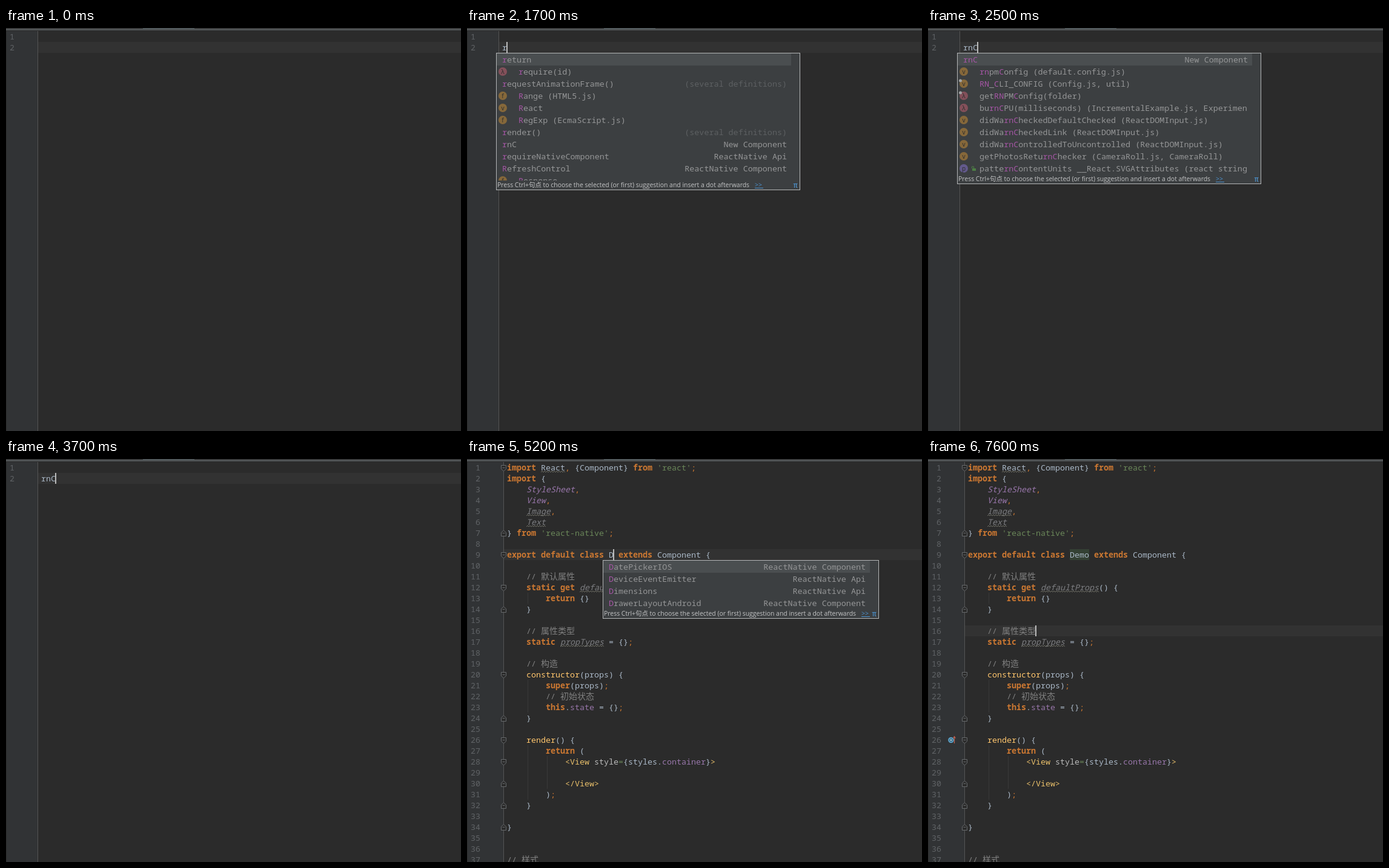
An HTML page for the animation above (8000 ms loop, 751 by 666 pixels).

```html
<!DOCTYPE html>
<html lang="en">
<head>
<meta charset="utf-8">
<title>Live template in an editor</title>
<style>
html, body { margin: 0; width: 100%; height: 100%; overflow: hidden; background: #2b2b2b; }
svg { display: block; }
text { font: 13.333px "Noto Sans Mono", "DejaVu Sans Mono", monospace; white-space: pre; fill: #a9b7c6; }
.num { fill: #606366; text-anchor: end; }
.k { fill: #cc7832; font-weight: 600; }
.o { fill: #cc7832; }
.s { fill: #6a8759; }
.t { fill: #e8bf6a; }
.a { fill: #bababa; }
.c, .z { fill: #808080; }
.z { font: 14px "Noto Sans CJK SC", "Noto Sans CJK JP", sans-serif; }
.y { fill: #ffc66d; }
.p { fill: #9876aa; }
.i { fill: #9876aa; font-style: italic; }
.u { fill: #7c7d80; font-style: italic; }
.item, .hit, .dim { font-size: 13.4px; }
.item { fill: #959697; }
.hit { fill: #a656a6; }
.dim { fill: #5d6062; }
.bold { font-weight: 600; }
.end { text-anchor: end; }
.icon { font: 10px "Noto Sans", sans-serif; fill: #2f2f2f; text-anchor: middle; }
.hint { font: 10.45px "Open Sans", "Noto Sans CJK SC", sans-serif; fill: #c3c4c5; }
.link { fill: #4c93d0; }
</style>
</head>
<body>
<svg id="stage" width="751" height="666" viewBox="0 0 751 666"></svg>
<script>
const LOOP = 8000, CHAR = 8, ITEM_CHAR = 8.04, LINE = 18, ROW = 20;
const stage = document.getElementById('stage');

// ‹x…› marks a token of style x; NAME is filled in while typing.
const code = `‹kimport› ‹wReact›‹o,› {Component} ‹kfrom› ‹s'react'›‹o;›
‹kimport› {
    ‹iStyleSheet›‹o,›
    ‹iView›‹o,›
    ‹uImage›‹o,›
    ‹uText›
} ‹kfrom› ‹s'react-native'›‹o;›

‹kexport› ‹kdefault› ‹kclass› NAME ‹kextends› Component {

    ‹c//› ‹z默认属性›
    ‹kstatic› ‹kget› ‹udefaultProps›() {
        ‹kreturn› {}
    }

    ‹c//› ‹z属性类型›
    ‹kstatic› ‹upropTypes› = {}‹o;›

    ‹c//› ‹z构造›
    ‹yconstructor›(props) {
        ‹ksuper›(props)‹o;›
        ‹c//› ‹z初始状态›
        ‹kthis›.‹pstate› = {}‹o;›
    }

    ‹yrender›() {
        ‹kreturn› (
            ‹t<View› ‹astyle›‹s=›{styles.‹pcontainer›}‹t>›

            ‹t</View>›
        )‹o;›
    }

}


‹c//› ‹z样式›`.split('\n');
const foldStarts = [1, 9, 12, 20, 26, 28], foldEnds = [7, 14, 24, 30, 32, 34];
const guides = [[100, 13, 13], [100, 21, 23], [100, 27, 31], [132, 28, 30]];
const semantic = 'wiupy';

// Items: text with ~matched~ parts, icon letter, right-hand note, badge.
const api = 'ReactNative Api', component = 'ReactNative Component', several = '(several definitions)';
const rnItems = [
  ['retu~rn~'],
  ['_possibleConstructorRetu~rn~(self, call) (table.js, serve', 'λ'],
  ['CanvasPatte~rn~ (HTML5.js)', 'f'],
  ['getInte~rn~alInstanceName()', '', several],
  ['IEExte~rn~al (DHTML.js)', 'f'],
  ['stringInte~rn~er()', '', several],
  ['Worke~rN~avigator (HTML5.js)', 'f'],
  ['~rn~C', '', 'New Component'],
  ['~r~equire~N~ativeComponent', '', api]
];
const rItems = [
  ['~r~eturn'],
  ['~r~equire(id)', 'λ'],
  ['~r~equestAnimationFrame()', '', several],
  ['~R~ange (HTML5.js)', 'f'],
  ['~R~eact', 'v'],
  ['~R~egExp (EcmaScript.js)', 'f'],
  ['~r~ender()', '', several],
  ['~r~nC', '', 'New Component'],
  ['~r~equireNativeComponent', '', api],
  ['~R~efreshControl', '', component],
  ['~R~esponse', 'f']
];
const lists = {
  r: rItems,
  rn: rnItems,
  rnMore: [...rnItems, ['~r~equestA~n~imationFrame()', '', several], ['~R~eactNative', 'v']],
  rnC: [
    ['~rnC~', '', 'New Component'],
    ['~rn~pm~C~onfig (default.config.js)', 'v'],
    ['~RN~_~C~LI_CONFIG (Config.js, util)', 'v', '', 'pin'],
    ['get~RN~PM~C~onfig(folder)', 'λ', '', 'pin'],
    ['bu~rnC~PU(milliseconds) (IncrementalExample.js, Experimen', 'λ'],
    ['didWa~rnC~heckedDefaultChecked (ReactDOMInput.js)', 'v'],
    ['didWa~rnC~heckedLink (ReactDOMInput.js)', 'v'],
    ['didWa~rnC~ontrolledToUncontrolled (ReactDOMInput.js)', 'v'],
    ['getPhotosRetu~rnC~hecker (CameraRoll.js, CameraRoll)', 'v'],
    ['patte~rnC~ontentUnits __React.SVGAttributes (react string', 'p', '', 'lock']
  ],
  D: [
    ['~D~atePickerIOS', '', component],
    ['~D~eviceEventEmitter', '', api],
    ['~D~imensions', '', api],
    ['~D~rawerLayoutAndroid', '', component]
  ],
  De: [['~De~viceEventEmitter', '', api]],
  Dem: [['~D~eviceEvent~Em~itter', '', api]]
};
const iconColors = { f: '#86683a', v: '#86683a', 'λ': '#84505a', p: '#635a8c' };

// Each entry changes part of the state from its time on.
const timeline = [
  [0, { typed: '', caret: false, list: '', bottom: 0, loading: false, code: false,
        folds: false, colored: false, override: false, marked: false, row: 2 }],
  [700, { caret: true }],
  [1500, { typed: 'r' }],
  [1700, { list: 'r', bottom: 268 }],
  [2000, { typed: 'rn' }],
  [2200, { list: 'rn', bottom: 238, loading: true }],
  [2300, { list: 'rnMore', bottom: 268, loading: false }],
  [2500, { typed: 'rnC', list: 'rnC', bottom: 258 }],
  [3000, { caret: false }],
  [3500, { caret: true }],
  [3700, { list: '' }],
  [3800, { code: true, typed: '', row: 9 }],
  [4000, { folds: true }],
  [4100, { colored: true }],
  [4800, { caret: false }],
  [5200, { typed: 'D', caret: true, list: 'D', bottom: 264 }],
  [5500, { typed: 'De', list: 'De', bottom: 204 }],
  [5900, { typed: 'Dem', list: 'Dem' }],
  [6400, { typed: 'Demo', list: '', marked: true }],
  [6800, { override: true }],
  [7600, { row: 16 }]
];

const escape = s => s.replace(/&/g, '&amp;').replace(/</g, '&lt;');
const text = (x, y, s, cls = '') => `<text x="${x}" y="${y}" class="${cls}">${escape(s)}</text>`;
const rect = (x, y, w, h, fill, more = '') =>
  `<rect x="${x}" y="${y}" width="${w}" height="${h}" fill="${fill}" ${more}/>`;
const circle = (x, y, r, fill) => `<circle cx="${x}" cy="${y}" r="${r}" fill="${fill}"/>`;
const path = (d, stroke, fill = 'none', width = 1) =>
  `<path d="${d}" stroke="${stroke}" fill="${fill}" stroke-width="${width}"/>`;
const lineTop = n => 5 + LINE * (n - 1);
const baseline = n => lineTop(n) + 14;

function wave(x, y, width) {
  let d = `M${x} ${y + 2}`;
  for (let i = 2; i <= width; i += 2) d += `L${x + i} ${y + (i % 4 ? 0 : 2)}`;
  return path(d, '#77776c', 'none', 0.9);
}

function codeLine(source, n, colored) {
  let x = 66, out = '';
  for (const part of source.match(/‹[^›]+›|[^‹]+/g) || []) {
    const marked = part[0] === '‹';
    const kind = marked ? part[1] : '';
    const s = marked ? part.slice(2, -1) : part;
    const plain = !colored && semantic.includes(kind);
    if (s.trim()) out += text(x, baseline(n), s, plain ? '' : kind);
    if (colored && (kind === 'u' || kind === 'w')) out += wave(x, lineTop(n) + 15, s.length * CHAR);
    x += s.length * CHAR;
  }
  return out;
}

function foldMark(n, end) {
  const y = lineTop(n) + 10, dir = end ? -1 : 1;
  return path(`M56.5 ${y - 4.5 * dir}h8v${6 * dir}l-4 ${3.5 * dir}l-4 ${-3.5 * dir}z`, '#66696b', '#2b2b2b') +
    path(`M58.5 ${y - .5}h4`, '#66696b');
}

function itemRow([label, letter, note, badge], x, y, right, bold) {
  let out = '', tx = x + (letter ? 37 : 10);
  if (letter) out += circle(x + 11, y + 10, 7, iconColors[letter]) + text(x + 11, y + 13.5, letter, 'icon');
  if (badge === 'pin') out += circle(x + 5.5, y + 5, 2.5, '#a0a2a3');
  if (badge === 'lock') out += rect(x + 25, y + 10, 6, 4, '#4d7f45') +
    path(`M${x + 24.5} ${y + 10}v-3h3v3`, '#4d7f45');
  label.split('~').forEach((s, i) => {
    if (s) out += text(tx, y + 15, s, (i % 2 ? 'hit' : 'item') + (bold ? ' bold' : ''));
    tx += s.length * ITEM_CHAR;
  });
  if (note) out += text(right - 22, y + 15, note, 'end ' + (note === several ? 'dim' : 'item'));
  return out;
}

function popup(s) {
  const [x, y, right] = s.code ? [224, 167, 680] : [48, 41, 550];
  const foot = s.bottom - 16;
  let out = rect(x + .5, y + .5, right - x - 1, s.bottom - y - 1, '#3c3f41', 'stroke="#b4b6b7"') +
    rect(x + 1, y + 1, right - x - 16, ROW, '#4a4e50');
  lists[s.list].forEach((item, i) => {
    out += itemRow(item, x, y + 1 + i * ROW, right, item[0] === 'retu~rn~');
  });
  if (s.loading) out += rect(519, 42, 16, 16, '#b2b4b5') + path('M523 55v-2M526 55v-4M529 53l1 2M531 50v2', '#d8d8d8');
  out += rect(x + 1, foot, right - x - 2, 15, '#3c3f41') +
    text(x + 2, s.bottom - 5, 'Press Ctrl+句点 to choose the selected (or first) suggestion and insert a dot afterwards', 'hint') +
    text(x + 427, s.bottom - 5, '>>', 'hint link') +
    path(`M${x + 427} ${s.bottom - 3.5}h14`, '#4c93d0') +
    text(right - 12, s.bottom - 4, 'π', 'link');
  return out;
}

function overrideMark() {
  return circle(38, 464.5, 4.8, '#5b9fc4') + circle(38, 464.5, 2.6, '#2f5266') + circle(38, 464.5, 1.5, '#a9cfe0') +
    path('M43.5 470v-11M41.5 461.5l2-3l2 3', '#c0614f', 'none', 1.2);
}

function frame(s) {
  const edge = s.code ? 60 : 52;
  const count = s.code ? code.length : 2;
  let out = rect(0, 0, 751, 666, '#2b2b2b') + rect(1, 5, edge - 1, 661, '#313335') +
    rect(edge + 1, lineTop(s.row), 750 - edge, LINE, '#323232') +
    rect(edge, 5, 1, 661, '#555555') +
    rect(0, 1, 751, 3, '#4f5355') + rect(226, 0, 85, 2, '#52595c');
  for (let n = 1; n <= count; n++) out += text(s.code ? 22 : 14, baseline(n), String(n), 'num');

  let caretX;
  if (s.code) {
    if (s.marked) out += rect(234, lineTop(9), 32, LINE, '#344134');
    if (s.folds) {
      for (const [x, from, to] of guides) out += rect(x, lineTop(from), 1, (to - from + 1) * LINE, '#393939');
      out += foldStarts.map(n => foldMark(n, false)).join('') + foldEnds.map(n => foldMark(n, true)).join('');
    }
    code.forEach((line, i) => { out += codeLine(line.replace('NAME', s.typed), i + 1, s.colored); });
    if (s.override) out += overrideMark();
    caretX = s.row === 16 ? 178 : 234 + s.typed.length * CHAR;
  } else {
    out += text(58, baseline(2), s.typed);
    caretX = 58 + s.typed.length * CHAR;
  }
  if (s.caret) out += rect(Math.max(58, caretX - 1), lineTop(s.row), 2, LINE, '#bbbbbb');
  if (s.list) out += popup(s);
  return out;
}

let shown = -1;
function update(now) {
  const t = now % LOOP;
  const step = timeline.filter(([from]) => from <= t).length;
  if (step !== shown) {
    shown = step;
    stage.innerHTML = frame(Object.assign({}, ...timeline.slice(0, step).map(e => e[1])));
  }
}

const start = performance.now();
function tick() {
  update(performance.now() - start);
  requestAnimationFrame(tick);
}
tick();
</script>
</body>
</html>
```
